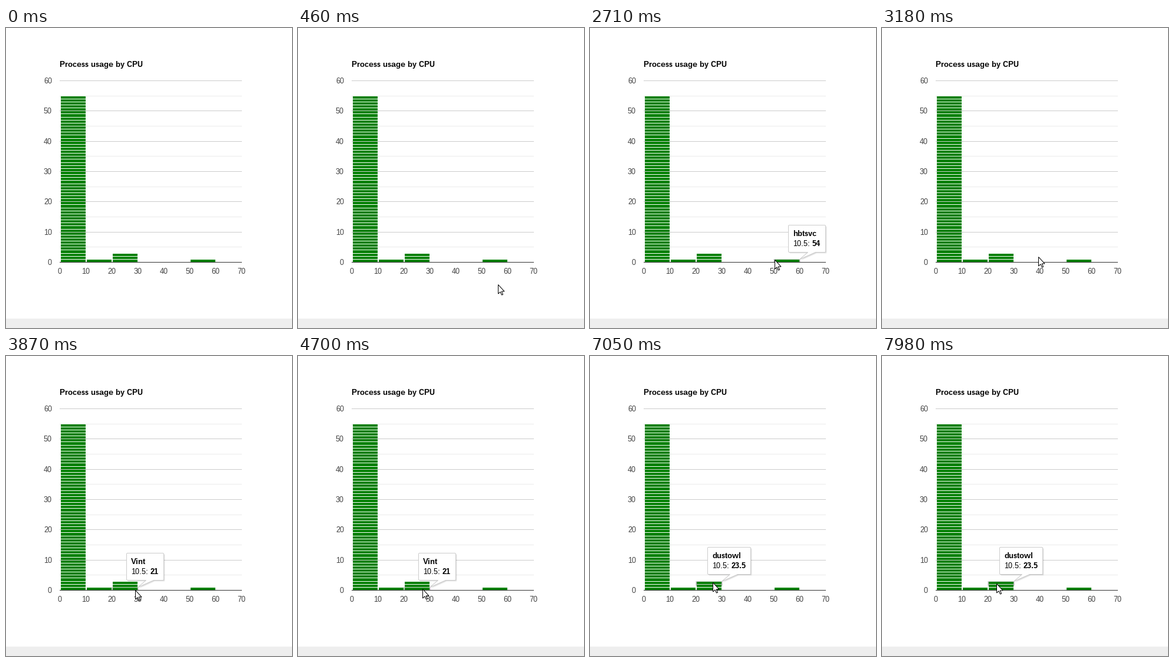
Write a matplotlib script that moves like this. It is 485x509 px and loops after 8 s.

```python
import math

import matplotlib.pyplot as plt
from matplotlib.animation import FuncAnimation
from matplotlib.collections import PolyCollection
from matplotlib.patches import Polygon, Rectangle

W, H, DPI = 485, 509, 64
LOOP, STEP = 8000, 20

LEFT, RIGHT = 91, 400
TOP, BASE = 89.5, 397.5
ORIGIN, BIN = 91.5, 44
UNIT = (BASE - TOP) / 60      # pixels per counted process
COUNTS = {0: 55, 1: 1, 2: 3, 5: 1}

# (bin, item from the bottom): name, value
ITEMS = {
    (5, 0): ("hbtsvc", "54"),
    (2, 0): ("Vint", "21"),
    (2, 1): ("foldmere", "28.6"),
    (2, 2): ("dustowl", "23.5"),
}

# The pointer slows into each stop: start ms, end ms, x, y
START = (356, 512)
GLIDES = [
    (110, 940, 330, 395),
    (2710, 3180, 265, 388),
    (3260, 3870, 219, 397),
    (3940, 3940, 217, 398),
    (4100, 4330, 214, 398),
    (4560, 4700, 211, 395),
    (5710, 6030, 209, 388),
    (6800, 6880, 208, 384),
    (7440, 7590, 205, 384),
    (7820, 7980, 194, 386),
]
POLL = 75                     # ms between pointer updates

ARROW = [(0.5, 0.5), (0.5, 16), (4, 12.7), (6.5, 18), (8.6, 17.1),
         (6.2, 11.9), (11, 11.9)]

plt.rcParams.update({"font.family": "Liberation Sans",
                     "text.hinting": "native", "text.hinting_factor": 1})
fig = plt.figure(figsize=(W / DPI, H / DPI), dpi=DPI, facecolor="white")
ax = fig.add_axes([0, 0, 1, 1])
ax.set_xlim(0, W)
ax.set_ylim(H, 0)
ax.axis("off")


def px(size):
    return size * 72 / DPI


def box(x0, y0, x1, y1):
    return [(x0, y0), (x1, y0), (x1, y1), (x0, y1)]


def fill(boxes, color, z):
    ax.add_collection(PolyCollection(boxes, facecolors=color,
                                     edgecolors="none", zorder=z))


def label(x, y, s, color="black", bold=False, ha="left", z=5):
    return ax.text(x, y, s, color=color, ha=ha, va="baseline", fontsize=px(13),
                   weight="bold" if bold else "normal", zorder=z)


def shape(z, **style):
    patch = Polygon([(0, 0), (1, 0), (1, 1)], closed=True, zorder=z, **style)
    ax.add_patch(patch)
    return patch


def level(count):
    return math.floor(BASE - count * UNIT)


def item_edges(b, i):
    x = ORIGIN + b * BIN
    return x + 1, level(i + 1) + 1, x + BIN - 1, level(i)


def row(value):
    y = level(value)
    return box(LEFT, y, RIGHT, y + 1)


fill([row(v) for v in range(5, 60, 10)], "#ebebeb", 0)
fill([row(v) for v in range(10, 70, 10)], "#cccccc", 0)
fill([box(*item_edges(b, i)) for b, n in COUNTS.items() for i in range(n)],
     "#008000", 2)
fill([row(0)], "#333333", 3)
fill([box(0, 493, W, H)], "#eeeeee", 0)

label(91, 66, "Process usage by CPU", bold=True)
for n in range(0, 70, 10):
    label(78, level(n) + 5, str(n), "#444444", ha="right")
for n in range(8):
    label(ORIGIN + n * BIN, 417, str(n * 10), "#444444", ha="center")

# Hover glow behind the bars, tooltip and pointer
halo = [shape(1, fill=False, edgecolor="#999999", alpha=a, linewidth=px(w))
        for w, a in ((3, 0.35), (1.2, 0.5))]
for glow in halo:
    glow.set_clip_path(Rectangle((LEFT, TOP), RIGHT - LEFT, BASE - TOP,
                                 transform=ax.transData))
shadows = [shape(6, facecolor="black", alpha=0.06, edgecolor="none")
           for _ in range(3)]
bubble = shape(7, facecolor="white", edgecolor="#cccccc", linewidth=px(1))
name_text = label(0, 0, "", bold=True, z=8)
key_text = label(0, 0, "10.5:", z=8)
value_text = label(0, 0, "", bold=True, z=8)
tip_parts = halo + shadows + [bubble, name_text, key_text, value_text]
cursor = shape(9, facecolor="white", edgecolor="black", linewidth=px(1),
               joinstyle="miter")


def cursor_at(t):
    x, y = START
    for start, end, x1, y1 in GLIDES:
        if t < start:
            break
        span = end - start
        steps = round(span / POLL) + 1
        k = steps
        if t < end:
            k = 1 + math.floor((t - start) * (steps - 1) / span)
        ease = 1 - (1 - k / steps) ** 2
        x, y = round(x + (x1 - x) * ease), round(y + (y1 - y) * ease)
    return x, y


def hovered(x, y):
    key = (math.floor((x - ORIGIN) / BIN), math.floor((BASE - y) / UNIT))
    return key if key in ITEMS else None


def place_tip(key):
    name, value = ITEMS[key]
    x0, y0, x1, y1 = item_edges(*key)
    for glow in halo:
        glow.set_xy(box(x0 - 0.5, y0 - 0.5, x1 + 0.5, y1 + 0.5))

    width = 64 if len(value) == 2 else 74
    tip_x, tip_y = x1 + 1, y0 - 0.5
    mid = tip_x + 13
    left = math.floor(mid - width / 2) + 0.5
    top = y0 - 58.5
    right, bottom = left + width - 1, top + 46
    outline = [(left + 1, top), (right - 1, top), (right, top + 1),
               (right, bottom - 1), (right - 1, bottom), (mid + 14, bottom),
               (tip_x, tip_y), (mid + 1, bottom), (left + 1, bottom),
               (left, bottom - 1), (left, top + 1)]
    bubble.set_xy(outline)
    for d, s in enumerate(shadows, 1):
        s.set_xy([(x + d * 0.7, y + d * 0.7) for x, y in outline])

    tx = left + 7.5
    name_text.set_text(name)
    name_text.set_position((tx, top + 18.5))
    key_text.set_position((tx, top + 35.5))
    value_text.set_text(value)
    value_text.set_position((tx + 33, top + 35.5))


def draw(n):
    t = n * STEP + STEP - 1
    x, y = cursor_at(t)
    cursor.set_xy([(x + dx, y + dy) for dx, dy in ARROW])
    key = hovered(x, y)
    for part in tip_parts:
        part.set_visible(key is not None)
    if key:
        place_tip(key)
    return tip_parts + [cursor]


anim = FuncAnimation(fig, draw, frames=LOOP // STEP, interval=STEP,
                     repeat=True, repeat_delay=0)
plt.show()
```
